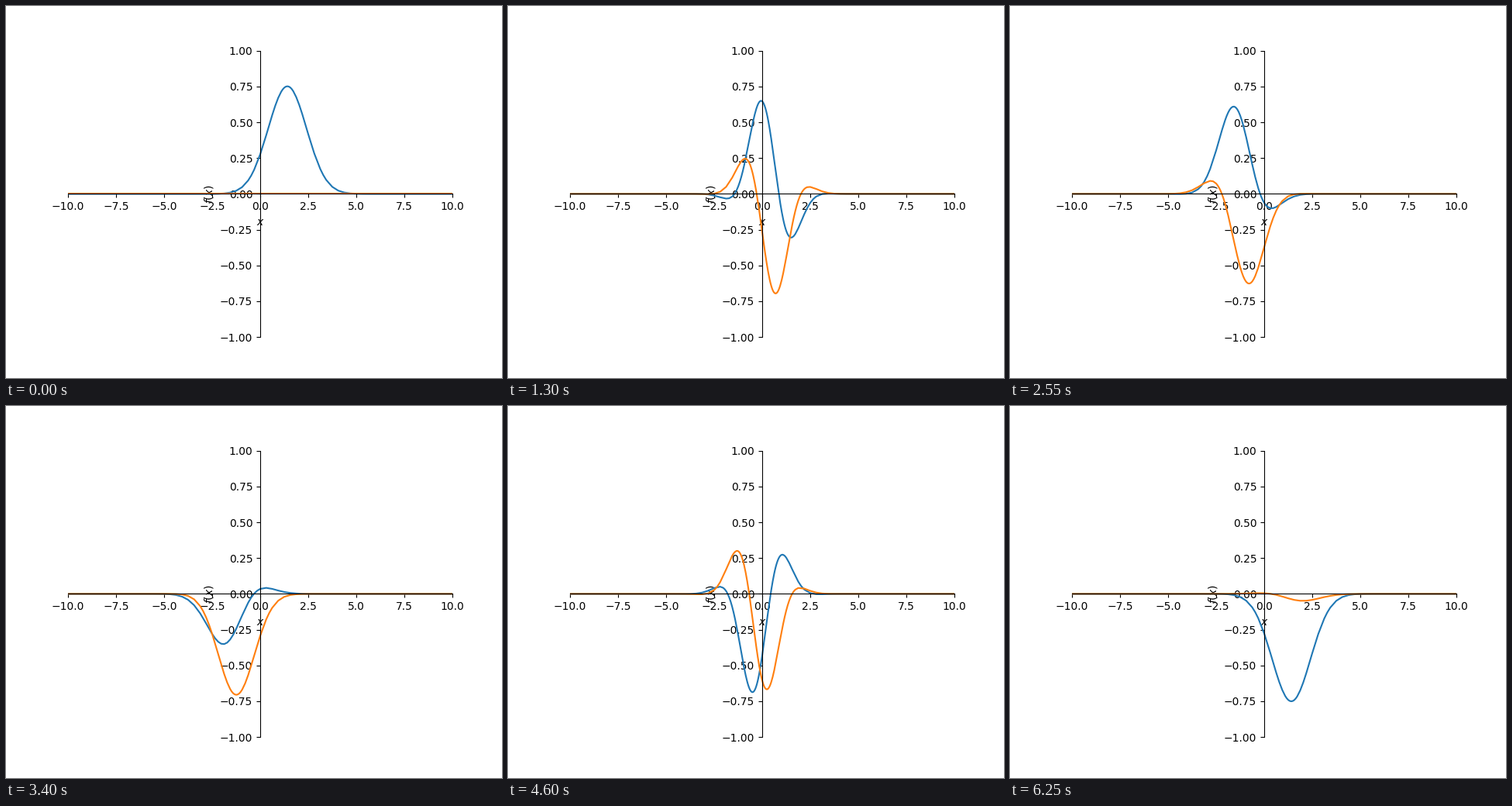
Recreate the animation shown at these times as a matplotlib script. Size 640 by 480 pixels, loop 6300 ms.

```python
"""Coherent state of a harmonic oscillator: real and imaginary parts of psi."""
import math

import matplotlib.pyplot as plt
from matplotlib.animation import FuncAnimation

FRAMES = 126
STEP = 0.05          # time per frame
X0 = math.sqrt(2)    # amplitude of the oscillation
X_MAX = 10
MIN_DEPTH, MAX_DEPTH = 6, 12


def psi(x, t):
    """Real and imaginary part of the wave function."""
    size = math.pi ** -0.25 * math.exp(-0.5 * (x - X0 * math.cos(t)) ** 2)
    phase = t / 2 + X0 * x * math.sin(t) - X0 ** 2 / 4 * math.sin(2 * t)
    return size * math.cos(phase), -size * math.sin(phase)


def is_flat(p, m, q, eps=1e-3):
    ax, ay = p[0] - m[0], p[1] - m[1]
    bx, by = q[0] - m[0], q[1] - m[1]
    cos = (ax * bx + ay * by) / (math.hypot(ax, ay) * math.hypot(bx, by))
    return abs(cos + 1) < eps


def sample(func):
    """Sample adaptively: split each span until it is nearly straight."""
    start, end = ((x, func(x)) for x in (-X_MAX, X_MAX))
    points = [start]

    def split(p, q, depth):
        x = (p[0] + q[0]) / 2
        mid = (x, func(x))
        if depth <= MAX_DEPTH and (depth < MIN_DEPTH or not is_flat(p, mid, q)):
            split(p, mid, depth + 1)
            split(mid, q, depth + 1)
        else:
            points.append(q)

    split(start, end, 0)
    return zip(*points)


fig, ax = plt.subplots(figsize=(6.4, 4.8), dpi=100)
ax.set_xlim(-X_MAX, X_MAX)
ax.set_ylim(-1, 1)
for side in ("left", "bottom"):
    ax.spines[side].set_position("zero")
for side in ("right", "top"):
    ax.spines[side].set_visible(False)
ax.set_xlabel("$x$")
ax.set_ylabel(r"$f{\left(x \right)}$")

lines = [ax.plot([], [], color=c)[0] for c in ("C0", "C1")]


def update(frame):
    t = frame * STEP
    for part, line in enumerate(lines):
        xs, ys = sample(lambda x: psi(x, t)[part])
        line.set_data(xs, ys)
    return lines


anim = FuncAnimation(fig, update, frames=FRAMES, interval=50, repeat=True)
plt.show()
```
